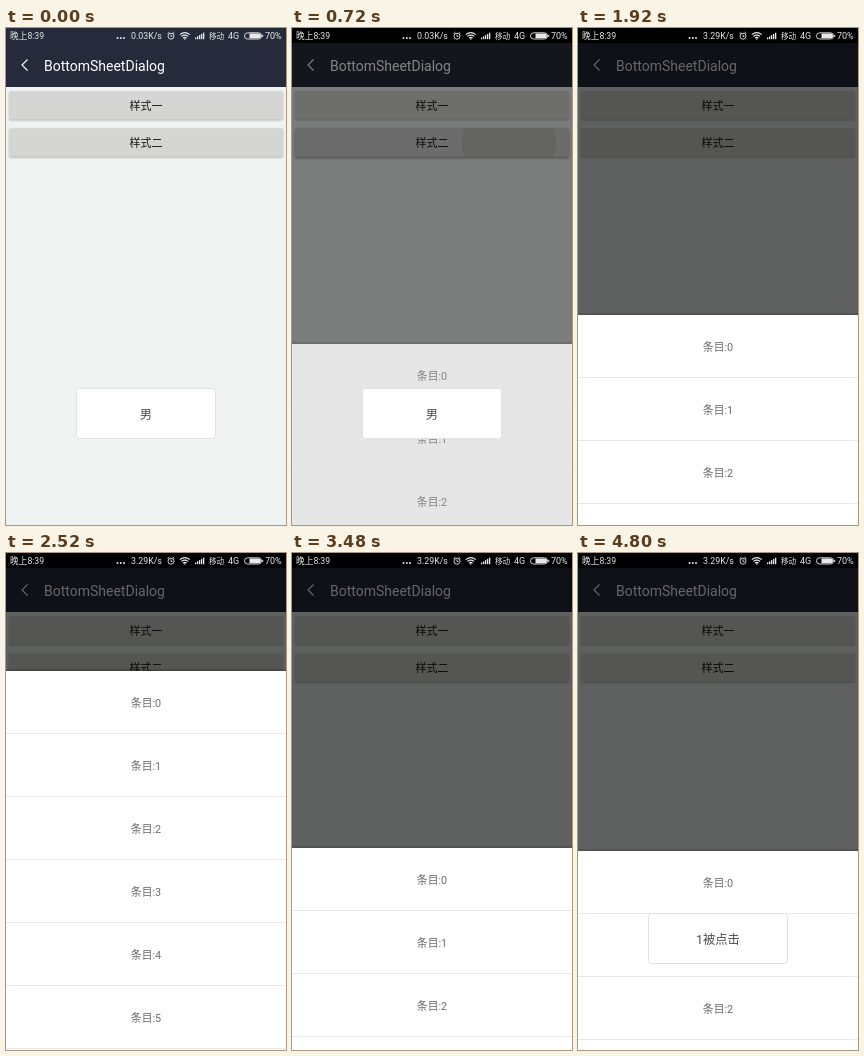
Write an HTML page with a canvas that moves like this. It is 280 px wide and 497 px high and loops after 5160 ms.

```html
<!DOCTYPE html>
<html lang="zh">
<head>
<meta charset="utf-8">
<title>BottomSheetDialog</title>
<style>
html, body { margin: 0; width: 100%; height: 100%; overflow: hidden; background: #eff3f2; }
canvas { display: block; width: 280px; height: 497px; }
</style>
</head>
<body>
<canvas width="280" height="497"></canvas>
<script>
const c = document.querySelector('canvas').getContext('2d');
const LOOP = 5160, STEP = 120, REST = 298, ITEM = 63;
const HEADER = '#262b3b';
const FONT = 'Roboto, "Noto Sans CJK SC", "Noto Sans CJK", sans-serif';

// Values per step, starting at the given step; the ends are held.
const track = (start, values) => step =>
  values[Math.max(0, Math.min(values.length - 1, step - start))];

const fade = track(2, [0, .03, .12, .45, .81, 1]);
const rise = track(3, [412, 390, 350, 316, REST]);
const drag = track(15, [REST, 287, 262, 228, 190, 150, 118, 95, 82, 74, 70,
  100, 190, 262, 295, 297, REST]);
const ripple = track(1, [8, 8, 11, 15, 28, 47]);
const toastOut = track(8, [1, .85, .62, .4, .18, 0]);
const toastIn = track(33, [0, .15, .35, .6, .8, .92, .97, 1]);
const toastShift = track(34, [6, 3, -3, -6, -4, -2, 0]);

function text(str, x, y, size, color, align = 'left') {
  c.font = `${size}px ${FONT}`;
  c.textAlign = align;
  c.fillStyle = color;
  c.fillText(str, x, y);
}

function rect(x, y, w, h, color) {
  c.fillStyle = color;
  c.fillRect(x, y, w, h);
}

function round(x, y, w, h, r) {
  c.beginPath();
  c.roundRect(x, y, w, h, r);
}

function disc(x, y, r, color) {
  c.beginPath();
  c.arc(x, y, r, 0, 7);
  c.fillStyle = color;
  c.fill();
}

function stroke(d, color, width) {
  c.strokeStyle = color;
  c.lineWidth = width;
  c.stroke(new Path2D(d));
}

function shadow(y, h, from, to) {
  const g = c.createLinearGradient(0, y, 0, y + h);
  g.addColorStop(0, `rgba(0,0,0,${from})`);
  g.addColorStop(1, `rgba(0,0,0,${to})`);
  rect(0, y, 280, h, g);
}

function statusBar(speed, back) {
  const white = '#e8e8e8';
  rect(0, 0, 280, 15, back);
  text('晚上8:39', 4, 11.2, 8.7, white);
  for (const x of [111.5, 114.8, 118]) disc(x, 10, 1, white);
  text(speed, 125, 11.2, 8.8, white);
  // alarm clock
  stroke('M162 8.2a3 3 0 1 0 6 0a3 3 0 1 0-6 0M165 6.5v2h1.5M161.6 5.6l1.8-1.5M168.4 5.6l-1.8-1.5', white, .9);
  // wifi
  stroke('M173.8 6.6q5-4 10 0M175.4 8.4q3.4-2.6 6.8 0M177 10q1.8-1.3 3.6 0', white, 1.1);
  disc(178.8, 11, .8, white);
  for (let i = 0; i < 5; i++) rect(189 + i * 2, 9.5 - i * 1.2, 1.3, 1.7 + i * 1.2, white);
  text('移动', 203, 11, 7.6, white);
  text('4G', 222, 11.2, 9, white);
  // battery, filled from the right
  round(238.5, 4.8, 17, 6.2, 3);
  c.strokeStyle = white;
  c.lineWidth = .9;
  c.stroke();
  round(243.5, 5.5, 11.5, 4.8, [0, 2.4, 2.4, 0]);
  c.fillStyle = white;
  c.fill();
  rect(256.2, 6.8, 1, 2.2, white);
  text('70%', 259, 11.2, 9, white);
}

function button(label, y, pressed) {
  c.save();
  c.shadowColor = pressed ? 'rgba(0,0,0,.45)' : 'rgba(0,0,0,.25)';
  c.shadowBlur = pressed ? 3 : 2;
  c.shadowOffsetY = 1;
  c.fillStyle = pressed ? '#d0d1cf' : '#d5d6d4';
  round(3, y, 274, 28.5, 2);
  c.fill();
  c.restore();
  if (pressed) {
    c.save();
    c.clip();
    disc(pressed > 28 ? 217 : 232, y + 14.5, pressed, 'rgba(0,0,0,.08)');
    c.restore();
  }
  text(label, 140, y + 18.7, 11, '#161616', 'center');
}

function page(step) {
  rect(0, 0, 280, 497, '#eff3f2');
  rect(0, 15, 280, 44, HEADER);
  stroke('M21.5 31.5L16 37L21.5 42.5', '#fff', 1.1);
  text('BottomSheetDialog', 38, 43, 14, '#fff');
  button('样式一', 63, 0);
  button('样式二', 100.3, step >= 1 && step < 7 ? ripple(step) : 0);
}

function sheet(top, alpha) {
  rect(0, 15, 280, 482, `rgba(0,0,0,${.6 * alpha})`);
  c.globalAlpha = alpha;
  shadow(top - 3, 3, 0, .22);
  rect(0, top, 280, 497 - top, '#fff');
  for (let i = 0, y = top; y < 497; i++, y += ITEM) {
    text('条目:' + i, 140, y + 36, 10.8, '#6c6c6c', 'center');
    rect(0, y + ITEM - 1, 280, 1, '#e8e8e8');
  }
  c.globalAlpha = 1;
}

function toast(label, size, alpha, dy) {
  c.globalAlpha = alpha;
  round(70.5, 360.5 + dy, 139, 50, 3);
  c.fillStyle = '#fff';
  c.fill();
  c.strokeStyle = '#dfe2e1';
  c.lineWidth = 1;
  c.stroke();
  text(label, 140, 391 + dy, size, '#4c4c4c', 'center');
  c.globalAlpha = 1;
}

function draw(now) {
  const step = Math.floor(now % LOOP / STEP);
  page(step);
  if (step > 2) sheet(step < 15 ? rise(step) : drag(step), fade(step));
  statusBar(step < 16 ? '0.03K/s' : '3.29K/s', step < 3 ? HEADER : '#000');
  if (step < 13) toast('男', 12.3, toastOut(step), 0);
  else if (step > 33) toast('1被点击', 12.3, toastIn(step), toastShift(step));
}

const start = performance.now();
function tick() {
  draw(performance.now() - start);
  requestAnimationFrame(tick);
}
tick();
</script>
</body>
</html>
```
